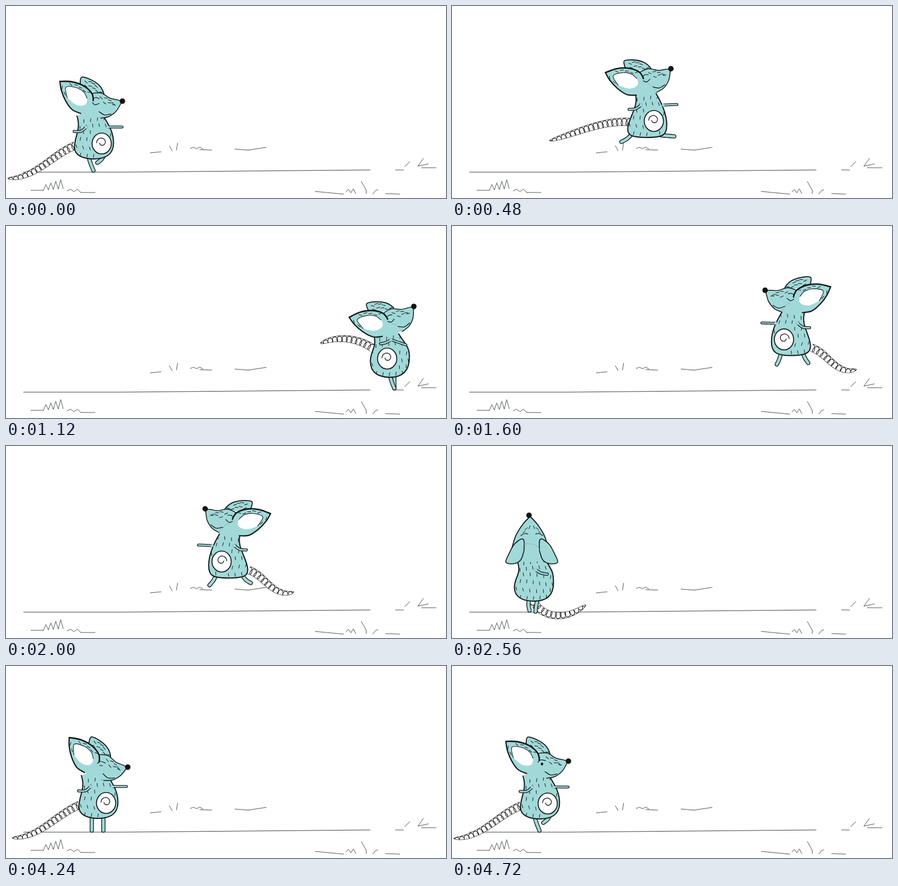
An HTML page with a canvas for the animation above (4.8 s loop, 800x349 px).

```html
<!DOCTYPE html>
<html lang="en">
<head>
<meta charset="utf-8">
<title>Leaping mouse</title>
<style>
html, body { margin: 0; width: 100%; height: 100%; overflow: hidden; background: #fff; }
canvas { display: block; width: 800px; height: 349px; }
</style>
</head>
<body>
<canvas id="stage" width="800" height="349"></canvas>
<script>
const ctx = document.getElementById('stage').getContext('2d');
const LOOP = 4800, STEP = 80, RAD = Math.PI / 180;
const INK = '#121416', SKIN = '#a1d9d9', PENCIL = '#4b5352';

// Poses are relative to the bottom centre of the body.
// head: ear tip x, y, turn; body: neck left, neck right, neck y, belly y, base width
// limbs: from x, y, to x, y, bend; tail: x, y, length, headings at start, middle, end
const stand = {
  face: [1], head: [-53, -146, 30.2], body: [-31, 17, -77, -20, 19], spot: [14, -27],
  legA: [-12, -4, -12, 23, 0], legB: [9, -2, 9, 23, 0],
  armA: [-14, -57, -36, -49, -8], armB: [25, -57, 51, -57, 0],
  tail: [-35, -23, 137, 22, 34, -2]
};
const lean = { ...stand, head: [-62, -140, 20.9], legA: [-10, -3, -1, 22, 1], legB: [18, -5, 6, 8, -3] };
const jump = {
  face: [1], head: [-76, -117, 0], body: [-22, 16, -79, -14, 30], spot: [12, -29],
  legA: [-28, -5, -47, 9, -3], legB: [25, -3, 49, -1, 0],
  armA: [-11, -58, -33, -50, -6], armB: [29, -58, 54, -59, 0],
  tail: [-33, -27, 149, -4, 17, 15]
};
const land = {
  face: [1], head: [-74, -108, -6.2], body: [-30, 16, -78, -28, 20], spot: [-5, -33],
  legA: [0, -2, 8, 21, 1], legB: [8, -2, 8, 21, 0],
  armA: [2, -67, -17, -60, -3], armB: [0, -68, 29, -58, 0],
  tail: [-33, -53, 97, -33, -5, 25]
};
const leap = {
  ...jump, face: [-1], head: [-77, -116, -.9],
  legA: [-27, -2, -41, 10, -3], legB: [23, -2, 34, 14, 2], tail: [-38, -13, 94, 18, 40, -25]
};
const drop = { ...leap, tail: [-38, -13, 118, 60, 48, 0] };
const crouch = { ...stand, face: [-1], head: lean.head, tail: leap.tail };
const ready = { ...stand, head: lean.head };
const sweep = { ...ready, tail: [-33, -18, 100, 75, 45, -30] };
const front = { face: [1], body: [-30, 23, -71, -24, 20], tail: [0, 3, 107, 120, 180, 220] };
const frontDown = { ...front, tail: [0, 3, 60, 85, 110, 165] };

// [time, pose, x, y]
const keys = [
  [0, lean, 160, 277], [160, lean, 159, 280], [480, jump, 355, 238], [720, jump, 532, 222],
  [1120, land, 698, 274], [1200, land, 698, 275], [1280, front, 686, 273], [1360, crouch, 660, 276],
  [1440, crouch, 655, 276], [1680, leap, 587, 220], [2000, leap, 404, 239], [2240, drop, 305, 246],
  [2400, drop, 212, 266], [2480, front, 172, 276], [2560, front, 149, 281], [2640, frontDown, 149, 283],
  [2720, sweep, 168, 279], [2800, sweep, 168, 276], [3040, ready, 168, 276], [3120, ready, 168, 276],
  [3440, stand, 168, 276], [4400, stand, 168, 276], [4720, lean, 160, 277], [LOOP, lean, 160, 277]
];

const mix = (a, b, k) => a + (b - a) * k;

function blend(p, q, k) {
  if (!p.head !== !q.head || p.face[0] !== q.face[0]) return p;
  const out = {};
  for (const part in p) out[part] = p[part].map((v, i) => mix(v, q[part][i], k));
  return out;
}

// Slope that never overshoots the keys
function slope(i, c) {
  if (!keys[i - 1] || !keys[i + 1]) return 0;
  const rate = j => (keys[j + 1][c] - keys[j][c]) / (keys[j + 1][0] - keys[j][0]);
  const a = rate(i - 1), b = rate(i);
  return a * b > 0 ? 2 * a * b / (a + b) : 0;
}

function stateAt(t) {
  const i = keys.findIndex((key, j) => t < keys[j + 1][0]);
  const a = keys[i], b = keys[i + 1], d = b[0] - a[0], k = (t - a[0]) / d;
  const place = c => mix(a[c], b[c], k * k * (3 - 2 * k))
    + d * k * (1 - k) * ((1 - k) * slope(i, c) - k * slope(i + 1, c));
  return { pose: blend(a[1], b[1], k), x: place(2), y: place(3) };
}

// Smooth line through the points
function curve(p, join) {
  const n = p.length / 2;
  const pt = i => { i = Math.max(0, Math.min(n - 1, i)); return [p[2 * i], p[2 * i + 1]]; };
  if (!join) ctx.beginPath();
  ctx.lineTo(p[0], p[1]);
  for (let i = 0; i < n - 1; i++) {
    const [a, b, c, d] = [pt(i - 1), pt(i), pt(i + 1), pt(i + 2)];
    ctx.bezierCurveTo(b[0] + (c[0] - a[0]) / 6, b[1] + (c[1] - a[1]) / 6,
      c[0] - (d[0] - b[0]) / 6, c[1] - (d[1] - b[1]) / 6, c[0], c[1]);
  }
}
function ink(w = 1.5, color = INK) {
  ctx.lineWidth = w; ctx.strokeStyle = color; ctx.stroke();
}
function fill(color = SKIN) { ctx.fillStyle = color; ctx.fill(); }
function line(p, w, color) { curve(p); ink(w, color); }
function shape(p, w) { curve(p); fill(); ink(w); }
function poly(p, w, color) {
  ctx.beginPath();
  for (let i = 0; i < p.length; i += 2) ctx.lineTo(p[i], p[i + 1]);
  ink(w, color);
}
function oval(x, y, rx, ry = rx) { ctx.beginPath(); ctx.ellipse(x, y, rx, ry, 0, 0, 7); }
function nose(x, y) { oval(x, y, 5); fill(INK); }

function dash(x, y, a, len = 6) {
  poly([x, y, x + Math.cos(a) * len, y + Math.sin(a) * len], 1);
}
function furRow(x0, y0, x1, y1, n) {
  const a = Math.atan2(y1 - y0, x1 - x0);
  for (let i = 0; i < n; i++) {
    const k = i / (n - 1);
    dash(mix(x0, x1, k), mix(y0, y1, k) + Math.sin(i * 5) * 1.5, a + .35 * Math.cos(i * 4));
  }
}

function limb([x0, y0, x1, y1, bend], w, open) {
  const m = Math.hypot(x1 - x0, y1 - y0);
  const p = [x0, y0, (x0 + x1 - (y1 - y0) / m * bend) / 2, (y0 + y1) / 2 + (x1 - x0) / m * bend / 2, x1, y1];
  line(p, w + 2.6);
  line(p, w, SKIN);
  if (open) { oval(x0, y0, w / 2 + 1.4); fill(); }
}

function drawTail([x, y, len, a0, a1, a2]) {
  const N = 360, up = [], down = [], coil = [];
  for (let i = 0; i <= N; i++) {
    const u = i / N;
    const a = (a0 * (1 - u) * (1 - 2 * u) + a1 * 4 * u * (1 - u) + a2 * u * (2 * u - 1)) * RAD;
    const tx = -Math.cos(a), ty = Math.sin(a), h = 6.8 * (1 - .32 * u) * Math.sqrt(1 - u ** 5);
    const turn = u * len / 8.8 * 2 * Math.PI, c = Math.cos(turn) * h * .92, s = Math.sin(turn) * h * .5;
    up.push(x - ty * h, y + tx * h);
    down.unshift(x + ty * h, y - tx * h);
    coil.push(x - ty * c + tx * s, y + tx * c + ty * s);
    x += tx * len / N;
    y += ty * len / N;
  }
  poly(up.concat(down), 1.3);
  fill('#fff');
  poly(coil, 1.1);
}

function traceBody([nl, nr, ny, by, base]) {
  const w = 35.5;
  ctx.beginPath();
  ctx.moveTo(nl, ny);
  ctx.bezierCurveTo(nl + 8, ny + 24, -w, by - 20, -w, by);
  ctx.bezierCurveTo(-w, by * .25, -base, 1, 0, 1);
  ctx.bezierCurveTo(base, 1, w, by * .3, w, by - 8);
  ctx.bezierCurveTo(w, by - 28, nr + 10, ny + 17, nr, ny);
}

function drawBody(p, nape, spot) {
  traceBody(p);
  ctx.lineTo(...nape);
  fill();
  ctx.save();
  ctx.clip();
  for (let j = 0; j < 6; j++) for (let i = 0; i < 6; i++) {
    const n = Math.sin(i * 12.9 + j * 78.2);
    const x = -31 + i * 12 + (j % 2) * 5 + n * 2, y = -73 + j * 12.5 + Math.cos(i * 7 + j) * 3;
    if (spot && Math.hypot((x - spot[0]) / 21, (y + 3 - spot[1]) / 24) < 1) continue;
    dash(x, y, 1.5 + n * .25);
  }
  ctx.restore();
  traceBody(p);
  ink(2);
}

function drawSpot([x, y]) {
  oval(x, y, 17.5, 19);
  fill('#fff');
  ink(1.7);
  const swirl = [];
  for (let i = 0; i <= 18; i++) {
    const a = 2.9 - i * .34, r = 4 + i * .3;
    swirl.push(x + Math.cos(a) * r, y - 2 + Math.sin(a) * r);
  }
  line(swirl, 1.3);
}

function drawEye(mood) {
  if (mood === 'shut') {
    line([69, 15, 75, 17, 81, 12], 1.3);
    line([67, 8, 72, 4, 78, 4], 1.1);
    return;
  }
  line([68, 15, 71, 9, 80, 7], 1.2);
  if (mood === 'open') { oval(76, 15, 2.2, 2.5); fill(INK); }
  else line([73, 16, 78, 14], 1.1);
}

function drawHead([x, y, rot], mood) {
  const farEar = [37, -6, 34, -21, 51, -23, 69, -19, 81, -10, 85, -2];
  const brow = [63, -1, 78, -7, 96, -4, 110, -6, 118, -6];
  const chin = [118, -3, 115, 14, 106, 28, 93, 36];
  const rim = [0, 0, 20, -7, 41, -8, 60, -2, 67, 6, 69, 11];
  const lobe = [56, 41, 39, 40, 22, 29, 8, 14, 0, 0];
  const inner = [23, 23, 14, 6, 33, 0, 48, 3, 57, 11];
  ctx.save();
  ctx.translate(x, y);
  ctx.rotate(rot * RAD);
  shape(farEar, 1.8);
  furRow(42, -17, 62, -17, 4);
  furRow(44, -10, 74, -9, 5);
  curve(brow);
  curve(chin, true);
  ctx.lineTo(56, 41);
  fill();
  line(brow, 1.4);
  line(chin, 1.5);
  curve(rim);
  ctx.lineTo(66, 28);
  curve(lobe, true);
  fill();
  line(rim, 2.6);
  line(lobe, 2.2);
  curve(inner.concat([59, 21, 53, 27, 41, 29, 23, 23]));
  fill('#fff');
  line(inner, 1.1);
  furRow(18, -3, 54, -1, 5);
  furRow(7, 6, 14, 17, 2);
  furRow(78, 0, 102, 1, 4);
  furRow(87, 7, 104, 6, 3);
  line([86, 26, 98, 28, 108, 22], 1.3);
  if (rot < 10) line([76, 19, 85, 25, 93, 35], .8, '#97a5a6');
  drawEye(mood);
  nose(119, -7);
  ctx.restore();
}

function mirrored(cx, paint) {
  for (const side of [-1, 1]) {
    ctx.save();
    ctx.translate(cx, 0);
    ctx.scale(side, 1);
    paint();
    ctx.restore();
  }
}

function drawFront(p) {
  drawTail(p.tail);
  limb([-9, -2, -8, 18, 3], 5);
  limb([7, -2, 3, 20, 2], 5);
  drawBody(p.body, [-6, -90]);
  mirrored(-7, () => {
    const cheek = [0, -153, 13, -139, 26, -118, 34, -92];
    curve(cheek);
    ctx.lineTo(30, -72);
    ctx.lineTo(-2, -70);
    ctx.lineTo(-2, -153);
    fill();
    line(cheek, 1.8);
  });
  mirrored(-4, () => {
    shape([14, -91, 14, -108, 19, -112, 32, -102, 41, -86, 47, -70, 33, -67, 20, -74, 14, -91], 1.6);
    line([7, -121, 13, -122, 20, -118], 1.2);
    furRow(3, -136, 12, -126, 3);
  });
  line([-18, -103, -4, -103, 6, -99, 11, -91], .8, '#97a5a6');
  limb([3, -56, 24, -48, 4], 3, true);
  nose(-9, -155);
}

function drawSide(p, mood) {
  const [hx, hy, rot] = p.head, c = Math.cos(rot * RAD), s = Math.sin(rot * RAD);
  drawTail(p.tail);
  limb(p.legB, 5);
  limb(p.legA, 5);
  drawBody(p.body, [hx + 78 * c - 18 * s, hy + 78 * s + 18 * c], p.spot);
  drawSpot(p.spot);
  drawHead(p.head, mood);
  limb(p.armB, 2.4, true);
  limb(p.armA, 2.8, true);
}

// [x0, y0, x1, y1, peaks, height]
const grass = [
  [262, 267, 282, 265], [297, 254, 302, 263], [312, 249, 310, 262], [335, 259, 358, 260, 2, 4],
  [352, 261, 374, 262], [416, 260, 440, 262], [440, 262, 473, 257],
  [708, 298, 723, 298], [725, 292, 734, 283], [759, 277, 749, 291], [749, 291, 768, 287], [755, 294, 782, 294],
  [45, 335, 68, 335], [68, 335, 104, 332, 4, 18], [111, 336, 136, 339, 2, 6], [136, 339, 162, 339],
  [562, 337, 614, 342], [618, 338, 636, 341, 2, 9], [646, 319, 655, 335], [655, 335, 655, 341],
  [667, 342, 676, 334, 1, 3], [690, 341, 716, 342]
];

function drawGround() {
  poly([32, 302, 210, 302, 662, 298], 1.2, '#3a4241');
  for (const [x0, y0, x1, y1, peaks = .5, high = 0] of grass) {
    const p = [], n = peaks * 2;
    for (let i = 0; i <= n; i++) p.push(mix(x0, x1, i / n), mix(y0, y1, i / n) - i % 2 * high * (.5 + i / n / 2));
    poly(p, 1, PENCIL);
  }
}

function moodAt(t) {
  if (t < 2960) return 'shut';
  return t >= 4240 && t < 4480 ? 'blink' : 'open';
}

function draw(now) {
  const t = Math.floor(now % LOOP / STEP) * STEP;
  const { pose, x, y } = stateAt(t);
  ctx.fillStyle = '#fff';
  ctx.fillRect(0, 0, 800, 349);
  ctx.lineCap = ctx.lineJoin = 'round';
  drawGround();
  ctx.save();
  ctx.translate(x, y);
  ctx.scale(pose.face[0], 1);
  if (pose.head) drawSide(pose, moodAt(t));
  else drawFront(pose);
  ctx.restore();
}

const begin = performance.now();
function tick() {
  draw(Math.max(0, performance.now() - begin));
  requestAnimationFrame(tick);
}
tick();
</script>
</body>
</html>
```
